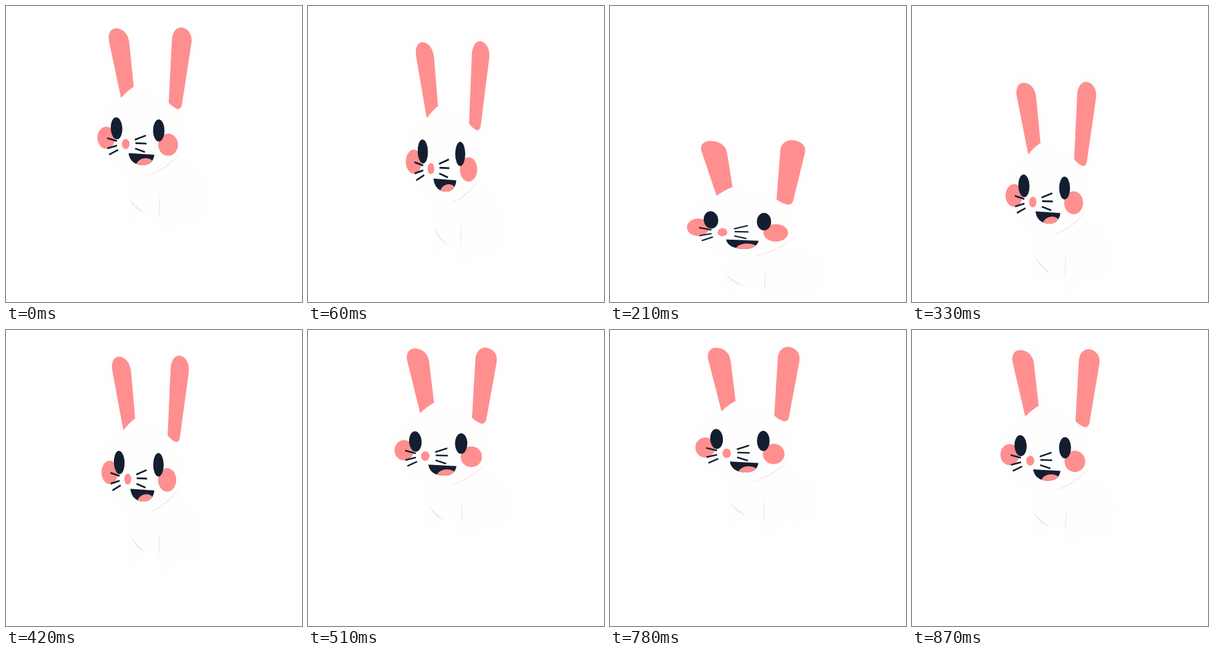
These frames come from a looping animation (480 by 480 pixels, 0.9 s). An HTML page:

```html
<!DOCTYPE html>
<html lang="en">
<head>
<meta charset="utf-8">
<title>Bouncing bunny</title>
<style>
  html, body { margin: 0; width: 100%; height: 100%; overflow: hidden; background: #fff; }
  svg { display: block; width: 100vw; height: 100vh; }
  .fur { fill: #fefefe; }
  .pink { fill: #ff8f8f; }
  .ink { fill: #131f30; }
  .crease { fill: #fddfe7; }
  .whiskers { fill: none; stroke: #131f30; stroke-width: 2.5; }
</style>
</head>
<body>
<svg viewBox="0 0 480 480">
  <clipPath id="mouth"><path d="M194 212.3L240.8 214.7Q238 230 219 230Q197 229 194 212.3Z"/></clipPath>
  <!-- Drawn at rest, standing on y = 330 -->
  <g id="bunny">
    <g class="fur">
      <path d="M195 235Q185 285 194 318Q206 330 216 305L245 308V329Q258 338 273 328L278 312Q320 322 332 300Q348 260 320 238L285 215Z"/>
      <path d="M176 145L147 50C139 10 204 -2 208 46L218 130Z"/>
      <path d="M258 145L261 42C266 -2 326 8 318 52L300 155Z"/>
      <ellipse cx="215" cy="183" rx="80" ry="64"/>
    </g>
    <g class="crease">
      <path d="M220 247.8Q267 239 292 207Q266 236 220 247.8Z"/>
      <path d="M194.5 277.5Q204 296 223 300.5Q207 292 194.5 277.5Z"/>
      <path d="M251.3 270Q251 292 249.4 309Q247.6 292 251.3 270Z"/>
    </g>
    <g class="pink">
      <path d="M180.5 131L159.3 49C156 36 162 28 173 28.5C186 29.5 194 38 195.5 50L203.5 114.5Q191 121 180.5 131Z"/>
      <path d="M266.5 138L272.2 45C273 34 280 27 289 27C301 28 309.5 37 307.5 50L290.3 141Q288 149 281 147Q273 144 266.5 138Z"/>
      <ellipse cx="154" cy="189.6" rx="16" ry="16.2"/>
      <ellipse cx="265.5" cy="200" rx="17.7" ry="16.4"/>
      <ellipse cx="189" cy="198.9" rx="6.9" ry="7.6"/>
    </g>
    <g class="ink">
      <ellipse cx="172.5" cy="175.8" rx="10.4" ry="16.2" transform="rotate(-4 172.5 175.8)"/>
      <ellipse cx="248.6" cy="179" rx="10.2" ry="16.3"/>
    </g>
    <path class="whiskers" d="M155.5 190.2L173.2 194.5M156 205.3L173.3 201.2M159.3 214.6L175.3 207.6M205.5 192.6L225.5 186.4M206.5 197.7L226.5 198.2M206 205.5L223.5 210.8"/>
    <g clip-path="url(#mouth)">
      <rect class="ink" x="190" y="210" width="54" height="22"/>
      <ellipse class="pink" cx="223.5" cy="230" rx="16" ry="10" transform="rotate(-7 223.5 230)"/>
    </g>
  </g>
</svg>
<script>
const bunny = document.getElementById('bunny');
const STEP = 30, STEPS = 30;

// Fall from the apex to the deepest squash: [step, ground y, width scale]
const fall = [
  [0, 328.5, 1.006], [2.5, 330, 1], [6.5, 350, 0.947], [7.5, 368, 0.9], [8.5, 394.5, 0.835],
  [10, 434, 0.795], [11.5, 466.5, 0.866], [14.5, 481, 1.13], [15, 481, 1.135]
];

const rate = (i, c) => (fall[i + 1][c] - fall[i][c]) / (fall[i + 1][0] - fall[i][0]);

function slope(i, c) {
  if (i === 0 || i === fall.length - 1) return 0;
  const before = fall[i][0] - fall[i - 1][0], after = fall[i + 1][0] - fall[i][0];
  return (rate(i - 1, c) * after + rate(i, c) * before) / (before + after);
}

// Cubic Hermite through the keys, column c
function sample(s, c) {
  let i = 0;
  while (i < fall.length - 2 && s >= fall[i + 1][0]) i++;
  const [a, b] = [fall[i], fall[i + 1]];
  const span = b[0] - a[0], u = (s - a[0]) / span, v = 1 - u;
  return v * v * (1 + 2 * u) * a[c] + u * u * (3 - 2 * u) * b[c]
    + span * u * v * (v * slope(i, c) - u * slope(i + 1, c));
}

function draw(now) {
  const step = Math.floor(now / STEP) % STEPS;
  // The rise mirrors the fall
  const s = Math.abs(15 - Math.abs(step - 7.5));
  const y = sample(s, 1), width = sample(s, 2);
  bunny.setAttribute('transform',
    `translate(240 ${y}) scale(${width} ${2 - width}) translate(-240 -330)`);
  requestAnimationFrame(() => draw(performance.now() - start));
}

const start = performance.now();
draw(0);
</script>
</body>
</html>
```
